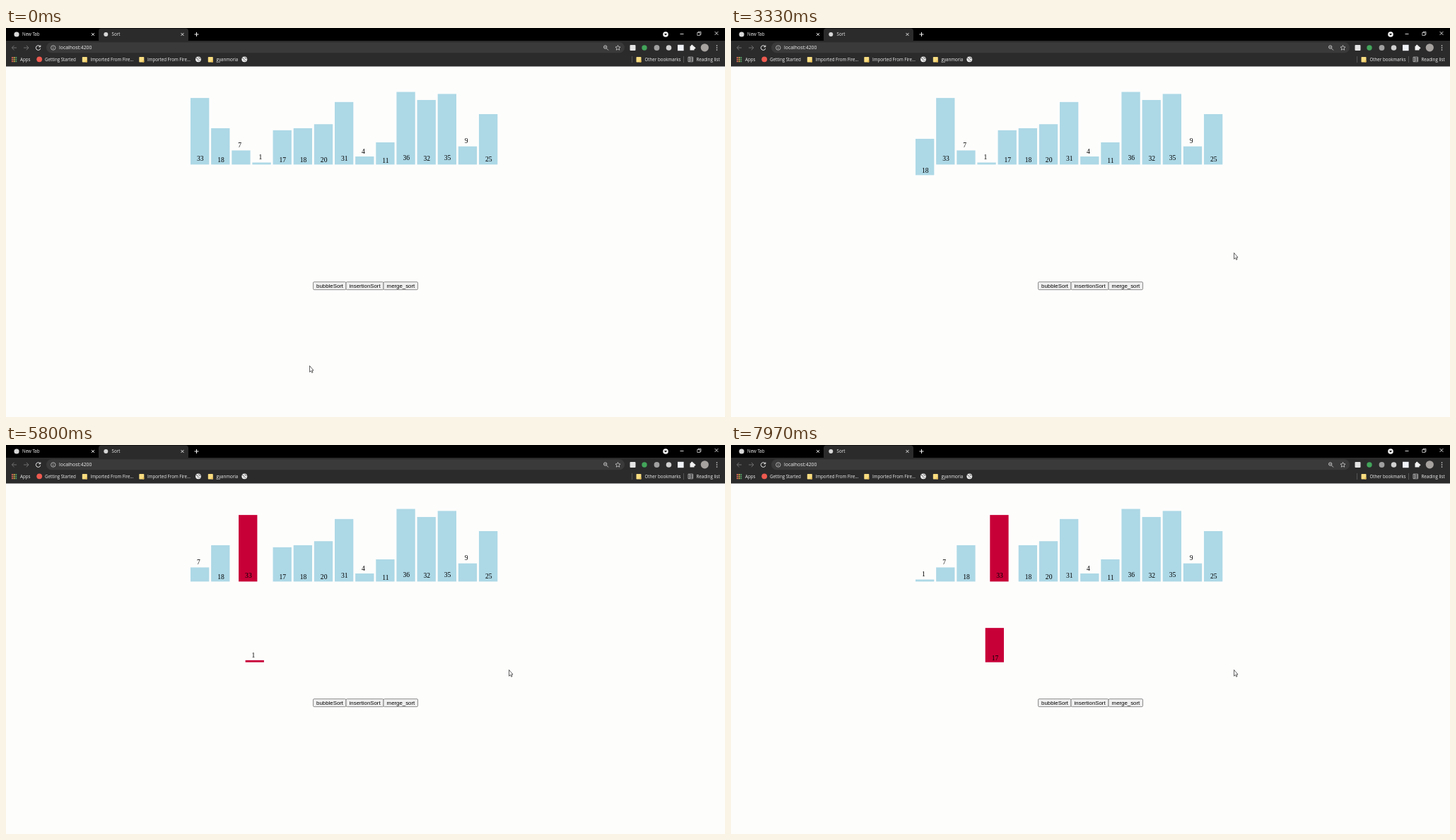
An HTML page with a canvas for the animation above (8 s loop, 1017x551 px).

```html
<!DOCTYPE html>
<html lang="en">
<head>
<meta charset="utf-8">
<title>Sort</title>
<style>
html, body { margin: 0; width: 100%; height: 100%; overflow: hidden; background: #fdfdfc; }
canvas { display: block; }
</style>
</head>
<body>
<canvas id="stage" width="1017" height="551"></canvas>
<script>
const ctx = document.getElementById('stage').getContext('2d');
const LOOP = 8000, PITCH = 29.14, DEPTH = 114.3, SWAP = 300, STEP = 360, RISE = 534;
const UI = '"Open Sans", "Noto Sans", sans-serif';
const values = [33, 18, 7, 1, 17, 18, 20, 31, 4, 11, 36, 32, 35, 9, 25];

// slot, start of drop, first swap, number of swaps, start of rise
const runs = [
  [1, 2022, 2567, 1, 2867],
  [2, 3402, 3947, 2, 4607],
  [3, 5141, 5700, 3, 6728],
  [4, 7262, 7787, 1, 8087]
];

// time, x, y of the pointer tip
const pointer = [
  [0, 429, 478], [30, 429, 478], [400, 419, 522], [630, 419, 522],
  [1430, 492, 366], [1630, 494, 367], [2030, 494, 367], [2850, 711, 318], [LOOP, 711, 318]
];

const clamp = p => Math.max(0, Math.min(1, p));

function rect(x, y, w, h, fill) {
  ctx.fillStyle = fill;
  ctx.fillRect(x, y, w, h);
}

function round(x, y, w, h, r, fill, line) {
  ctx.beginPath();
  ctx.roundRect(x, y, w, h, r);
  if (fill) { ctx.fillStyle = fill; ctx.fill(); }
  if (line) { ctx.strokeStyle = line; ctx.stroke(); }
}

function disc(x, y, r, fill) {
  ctx.beginPath();
  ctx.arc(x, y, r, 0, 7);
  ctx.fillStyle = fill;
  ctx.fill();
}

function stroke(d, color = '#eee', width = 0.9) {
  ctx.strokeStyle = color;
  ctx.lineWidth = width;
  ctx.stroke(new Path2D(d));
}

function text(s, x, y, size = 6.2, color = '#f0f0f0', family = UI) {
  ctx.font = `${size}px ${family}`;
  ctx.fillStyle = color;
  ctx.fillText(s, x, y);
}

function cross(x, y, r) {
  stroke(`M${x - r} ${y - r}l${2 * r} ${2 * r}m0 ${-2 * r}l${-2 * r} ${2 * r}`);
}

function folder(x) {
  round(x, 41, 7, 7.5, 0.7, '#f8dc80');
  rect(x + 5, 46, 2, 2.5, '#e5b950');
}

function globe(x) {
  disc(x, 44.3, 3.9, '#eee');
  stroke(`M${x - 3} 42.5l2 1 1 1.3-1 1M${x + 0.5} 41.5l1 1.5 1.8 0M${x + 0.5} 47l1.5-1.5`, '#444', 0.9);
}

function drawTabs() {
  rect(0, 0, 1017, 18, '#000');
  rect(0, 18, 1017, 36.5, '#2b2b2c');
  round(131, 0.5, 127, 20, 4, '#2b2b2c');
  disc(15, 9, 3.6, '#d8d8d8');
  text('New Tab', 23, 11.3);
  cross(123, 9, 2);
  disc(141.3, 9, 3, '#d8d8d8');
  text('Sort', 149.5, 11.3);
  cross(249.5, 9, 2);
  stroke('M266.5 9h6M269.5 6v6', '#eee', 1.1);
  disc(933, 9, 3.8, '#f4f4f4');
  ctx.fillStyle = '#000';
  ctx.fill(new Path2D('M931 8h4l-2 2.5z'));
  stroke('M953.5 8.5h5');
  stroke('M977.8 6.5h4v4h-4zM979 6.5v-1.2h4v4h-1.2', '#eee', 0.7);
  cross(1005, 7.5, 2.4);
}

function drawToolbar() {
  stroke('M15 28H8.5M11.5 24.8L8.3 28l3.2 3.2', '#777');
  stroke('M25 28h6.5M28.8 24.8l3.2 3.2-3.2 3.2', '#777');
  stroke('M48.2 26A3.3 3.3 0 1 0 48.8 29M48.8 24.5v2.3h-2.3', '#eee', 1);
  round(57, 20.3, 818, 15, 7.5, '#3a3a3b');
  stroke('M63.6 28a3.2 3.2 0 1 0 6.4 0a3.2 3.2 0 1 0-6.4 0M66.8 27.5v2.3M66.8 25.8v.8', '#ddd', 0.7);
  text('localhost:4200', 75, 30.4, 6.9);
  stroke('M845.5 27a2.2 2.2 0 1 0 4.4 0a2.2 2.2 0 1 0-4.4 0M849.3 28.8l2.7 2.7M846.7 27h2', '#ddd', 0.8);
  stroke('M865.5 24.5l1 2.2 2.5.3-1.8 1.7.5 2.5-2.2-1.2-2.2 1.2.5-2.5-1.8-1.7 2.5-.3z', '#ddd', 0.7);
  round(882.5, 24, 8, 8, 1, '#e4e4e4');
  disc(903, 28, 3.7, '#42a55a');
  disc(920.5, 28, 3.9, '#a0a0a0');
  disc(937.5, 28, 3.8, '#d0d0d0');
  rect(950, 23.8, 8.6, 8.4, '#f0f3f8');
  round(967.5, 25.5, 6, 6, 0.6, '#f2f2f2');
  disc(970.3, 25.2, 1.4, '#f2f2f2');
  disc(973.8, 28.3, 1.4, '#f2f2f2');
  disc(988.3, 27.8, 5.6, '#a6a29f');
  for (const y of [25, 28, 31]) disc(1005.5, y, 0.8, '#eee');
}

function drawBookmarks() {
  const hues = ['#e66a5c', '#e9bd4b', '#58a86a', '#5b91e0'];
  for (let i = 0; i < 9; i++)
    rect(8 + i % 3 * 2.7, 41 + (i / 3 | 0) * 2.7, 1.8, 1.8, hues[(i + (i / 3 | 0)) % 4]);
  text('Apps', 20, 46.6);
  disc(47.2, 44.3, 3.9, '#ee5a4f');
  text('Getting Started', 55, 46.6);
  folder(107.8);
  text('Imported From Fire...', 119.5, 46.6);
  folder(188.3);
  text('Imported From Fire...', 200, 46.6);
  globe(272);
  folder(285.8);
  text('gyanmoria', 297.5, 46.6);
  globe(337.3);
  rect(885, 40, 0.7, 9, '#666');
  folder(891.5);
  text('Other bookmarks', 903.5, 46.6);
  rect(958, 40, 0.7, 9, '#666');
  stroke('M965 41.2h6.5v6.5H965zM967 41.2v6.5M967 43.3h4.5M967 45.5h4.5', '#ddd', 0.7);
  text('Reading list', 976.5, 46.6);
}

function drawButtons() {
  const font = '"Liberation Sans", Arial, sans-serif';
  ctx.lineWidth = 0.8;
  for (const [label, x, w] of [['bubbleSort', 434.5, 46.5], ['insertionSort', 481, 53], ['merge_sort', 534, 48.5]]) {
    round(x, 359.7, w, 11, 1.4, '#efefef', '#707070');
    text(label, x + 4.6, 368, 7.85, '#000', font);
  }
}

function barsAt(t) {
  const order = values.map((v, i) => ({ v, slot: i, y: 0, red: false }));
  const bars = [...order];
  for (const [slot, drop, move, count, rise] of runs) {
    if (t < drop) break;
    const key = order[slot];
    key.y = DEPTH * (clamp((t - drop) / (move - drop)) - clamp((t - rise) / RISE));
    for (let k = 0; k < count; k++) {
      const start = move + k * STEP, other = order[slot - 1 - k];
      const p = clamp((t - start) / SWAP);
      key.slot -= p;
      other.slot += p;
      // the next pair lights up as soon as the previous swap is over
      const lit = k ? start - STEP + SWAP : start;
      if (t >= lit && t < start + SWAP) key.red = other.red = true;
    }
    order.splice(slot, 1);
    order.splice(slot - count, 0, key);
  }
  return bars;
}

function drawBars(t) {
  for (const { v, slot, y, red } of barsAt(t)) {
    const x = 261 + slot * PITCH, h = v * 2.857, base = 193.4 + y;
    rect(x, base - h, 26.3, h, red ? '#c80038' : '#add8e6');
    const line = v < 10 ? base - h - 4.3 : base - 0.2 - v * 0.17;
    text(v, x + 9, line, 9.6, '#000', '"Liberation Serif", Times, serif');
  }
}

function drawPointer(t) {
  const i = pointer.findIndex(p => p[0] > t);
  const [t0, x0, y0] = pointer[i - 1], [t1, x1, y1] = pointer[i];
  let p = (t - t0) / (t1 - t0);
  p = p * p * (3 - 2 * p);
  ctx.save();
  ctx.translate(x0 + (x1 - x0) * p, y0 + (y1 - y0) * p);
  const arrow = 'M.5 .5V9.3L2.4 7.6 3.7 10.3 5 9.7 3.8 7H6z';
  ctx.fillStyle = '#fff';
  ctx.fill(new Path2D(arrow));
  stroke(arrow, '#222', 0.7);
  ctx.restore();
}

function frame(now) {
  const t = now % LOOP;
  rect(0, 0, 1017, 551, '#fdfdfc');
  drawTabs();
  drawToolbar();
  drawBookmarks();
  drawButtons();
  drawBars(t);
  drawPointer(t);
}

const begin = performance.now();
(function tick() {
  frame(performance.now() - begin);
  requestAnimationFrame(tick);
})();
</script>
</body>
</html>
```
